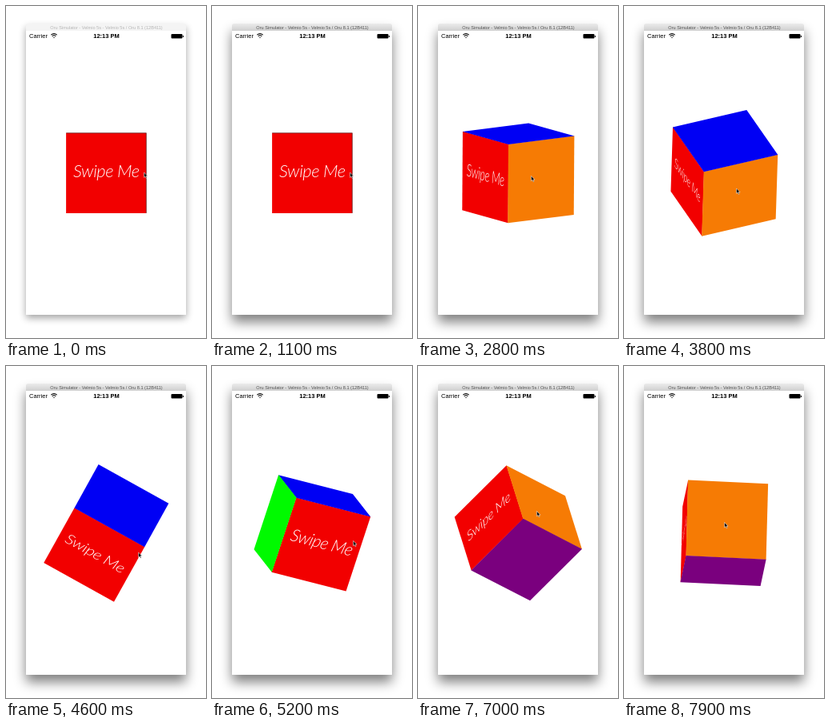
An HTML page that plays this animation: 250 by 415 pixels, repeating every 8 s.

```html
<!DOCTYPE html>
<html lang="en">
<head>
<meta charset="utf-8">
<title>Swipe cube</title>
<style>
  html, body { margin: 0; width: 100%; height: 100%; overflow: hidden; background: #fff; }
  svg { display: block; width: 250px; height: 415px; }
  text { font-family: "Liberation Sans", Arial, sans-serif; }
  .label { font: italic 300 22px Lato, sans-serif; letter-spacing: -.5px; }
</style>
</head>
<body>
<svg viewBox="0 0 250 415">
  <defs>
    <filter id="soft" x="-30%" y="-30%" width="160%" height="160%"><feGaussianBlur stdDeviation="5"/></filter>
    <filter id="deep" x="-30%" y="-30%" width="160%" height="160%"><feGaussianBlur stdDeviation="7.5"/></filter>
    <linearGradient id="bar" x2="0" y2="1">
      <stop stop-color="#ebebeb"/><stop offset="1" stop-color="#cfcfcf"/>
    </linearGradient>
  </defs>

  <rect id="shadowIdle" x="25" y="27" width="200" height="363" opacity=".36" filter="url(#soft)"/>
  <rect id="shadowActive" x="25" y="32" width="200" height="363" opacity=".5" filter="url(#deep)"/>
  <rect x="25" y="30" width="200" height="356" fill="#fff"/>
  <path id="titleBar" d="M25 31V24.500q0-2.500 2.500-2.500h195q2.500 0 2.500 2.500V31z"/>
  <text id="title" x="125.500" y="28.800" font-size="5.600" text-anchor="middle">Oru Simulator - Velmio 5s - Velmio 5s / Oru 8.1 (12B411)</text>

  <text x="29" y="40.300" font-size="7.500">Carrier</text>
  <g fill="none" stroke="#000" stroke-width="1.100">
    <path d="M56.300 36.200q3.700-3.200 7.400 0M57.700 37.800q2.300-2 4.600 0"/>
    <path d="M59 39l1 1.200 1-1.200z" fill="#000" stroke="none"/>
  </g>
  <text x="125.500" y="40.300" font-size="7.500" font-weight="bold" text-anchor="middle">12:13 PM</text>
  <rect x="206.500" y="35" width="14" height="5.500" rx="1"/>
  <rect x="221" y="36.700" width="1" height="2.200" rx=".5"/>

  <g id="cube"></g>
  <path id="edge" d="M75.300 158.800H175.300V258.800" fill="none" stroke="#333" stroke-width=".8" opacity=".75"/>
  <path id="cursor" d="M0 0V6.300L1.500 5 2.500 7.300 3.600 6.800 2.600 4.600H4.600Z" fill="#111" stroke="#fff" stroke-width=".5"/>
</svg>
<script>
const LOOP = 8000, ACTIVATE = 700, STEP = 20;
const CX = 125.3, CY = 208.8, HALF = 50;
const TURN = 1.6 * Math.PI / 180; // radians per dragged pixel
const $ = id => document.getElementById(id);

// time, cursor x, cursor y, then screen x and y of the cube's right, down and depth axes
const keys = [
  [1400, 172.5, 208, 1, 0, 0, 0, 1, 0],
  [1900, 166.5, 208, .965, -.005, .25, .04, .995, -.045],
  [3100, 135.5, 215, .42, 0, .906, .235, .966, -.109],
  [3800, 140.5, 228, .385, -.025, .915, .56, .805, -.21],
  [4600, 165.5, 233, .87, -.38, .3, .48, .68, -.54],
  [5900, 180.5, 198.5, .94, .14, -.315, -.085, .975, .2],
  [7000, 148.5, 181.5, .65, .21, .735, -.64, .67, .385],
  [7900, 125.5, 195.5, .07, -.025, .995, -.33, .94, .05]
].map(([t, x, y, ...m]) => ({ t, p: [x, y], q: fromRows(m.slice(0, 3), m.slice(3)) }));

function unit(v) {
  const n = Math.hypot(...v);
  return v.map(c => c / n);
}

// Quaternions are [w, x, y, z]
function fromRows(r, s) {
  r = unit(r);
  const d = r[0] * s[0] + r[1] * s[1] + r[2] * s[2];
  s = unit(s.map((c, i) => c - d * r[i]));
  const u = [r[1] * s[2] - r[2] * s[1], r[2] * s[0] - r[0] * s[2], r[0] * s[1] - r[1] * s[0]];
  const w = Math.sqrt(1 + r[0] + s[1] + u[2]) / 2;
  return unit([w, (u[1] - s[2]) / (4 * w), (r[2] - u[0]) / (4 * w), (s[0] - r[1]) / (4 * w)]);
}

function mul([a, b, c, d], [e, f, g, h]) {
  return [
    a * e - b * f - c * g - d * h,
    a * f + b * e + c * h - d * g,
    a * g - b * h + c * e + d * f,
    a * h + b * g - c * f + d * e
  ];
}

const inverse = ([w, x, y, z]) => [w, -x, -y, -z];

function spin(x, y, z) {
  const n = Math.hypot(x, y, z);
  if (!n) return [1, 0, 0, 0];
  const k = Math.sin(n / 2) / n;
  return [Math.cos(n / 2), x * k, y * k, z * k];
}

function part(q, s) {
  if (q[0] < 0) q = q.map(c => -c);
  const n = Math.hypot(q[1], q[2], q[3]);
  if (n < 1e-6) return [1, 0, 0, 0];
  const k = 2 * Math.atan2(n, q[0]) * s / n;
  return spin(q[1] * k, q[2] * k, q[3] * k);
}

function slope(i, axis) {
  if (!i) return 0;
  const a = keys[i - 1], b = keys[Math.min(i + 1, keys.length - 1)];
  return (b.p[axis] - a.p[axis]) / (b.t - a.t);
}

// Smooth cursor path through the keys
function cursorAt(t) {
  const last = keys.length - 1;
  if (t <= keys[0].t) return keys[0].p;
  if (t >= keys[last].t) return keys[last].p;
  const i = keys.findIndex(k => k.t > t) - 1;
  const a = keys[i], b = keys[i + 1], h = b.t - a.t, s = (t - a.t) / h;
  return [0, 1].map(n => {
    const e = s * s * (3 - 2 * s);
    return a.p[n] * (1 - e) + b.p[n] * e
      + h * s * (1 - s) * ((1 - s) * slope(i, n) - s * slope(i + 1, n));
  });
}

// Roll the cube under the cursor; spread each span's drift evenly over it
const poses = [keys[0].q];
for (let i = 0; i + 1 < keys.length; i++) {
  const a = keys[i], b = keys[i + 1], rolled = [];
  let q = a.q, from = a.p;
  for (let t = a.t + STEP; t <= b.t; t += STEP) {
    const to = cursorAt(t);
    q = mul(spin((to[1] - from[1]) * TURN, (from[0] - to[0]) * TURN, 0), q);
    rolled.push(q);
    from = to;
  }
  const drift = mul(b.q, inverse(q));
  rolled.forEach((r, n) => poses.push(mul(part(drift, (n + 1) / rolled.length), r)));
}

function poseAt(t) {
  const f = Math.max(0, Math.min(poses.length - 1, (t - keys[0].t) / STEP));
  const i = Math.floor(f), a = poses[i], b = poses[Math.min(i + 1, poses.length - 1)];
  return mul(part(mul(b, inverse(a)), f - i), a);
}

function axes([w, x, y, z]) {
  return [
    [1 - 2 * (y * y + z * z), 2 * (x * y + w * z), 2 * (x * z - w * y)],
    [2 * (x * y - w * z), 1 - 2 * (x * x + z * z), 2 * (y * z + w * x)],
    [2 * (x * z + w * y), 2 * (y * z - w * x), 1 - 2 * (x * x + y * y)]
  ];
}

// u, v: face axes; n, dir: outward normal
const faces = [
  { fill: '#f20000', u: 0, v: 1, n: 2, dir: -1, text: 'Swipe Me' },
  { fill: '#f67b04', u: 2, v: 1, n: 0, dir: 1 },
  { fill: '#0000f4', u: 0, v: 2, n: 1, dir: -1 },
  { fill: '#00fa00', u: 2, v: 1, n: 0, dir: -1 },
  { fill: '#7a007e', u: 0, v: 2, n: 1, dir: 1 }
];

function add(parent, tag, attrs) {
  const el = document.createElementNS('http://www.w3.org/2000/svg', tag);
  for (const k in attrs) el.setAttribute(k, attrs[k]);
  return parent.appendChild(el);
}

for (const f of faces) {
  f.el = add($('cube'), 'g', {});
  add(f.el, 'rect', { x: -50.2, y: -50.2, width: 100.4, height: 100.4, fill: f.fill });
  if (f.text) {
    add(f.el, 'text', { class: 'label', y: 5, fill: '#fff', 'text-anchor': 'middle' }).textContent = f.text;
  }
}

const show = (el, on) => el.setAttribute('visibility', on ? 'visible' : 'hidden');

function render(t) {
  const active = t >= ACTIVATE;
  show($('shadowIdle'), !active);
  show($('shadowActive'), active);
  $('titleBar').setAttribute('fill', active ? 'url(#bar)' : '#f4f4f4');
  $('title').setAttribute('fill', active ? '#505050' : '#b4b4b4');
  show($('edge'), t < keys[0].t);

  const m = axes(poseAt(t));
  for (const f of faces) {
    const u = m[f.u], v = m[f.v], n = m[f.n], d = f.dir * HALF;
    show(f.el, n[2] * f.dir < -.002);
    const mat = [u[0], u[1], v[0], v[1], CX + n[0] * d, CY + n[1] * d];
    f.el.setAttribute('transform', `matrix(${mat.map(c => c.toFixed(4))})`);
  }
  $('cursor').setAttribute('transform', `translate(${cursorAt(t)})`);
}

const start = performance.now();
function tick() {
  render((performance.now() - start) % LOOP);
  requestAnimationFrame(tick);
}
tick();
</script>
</body>
</html>
```
